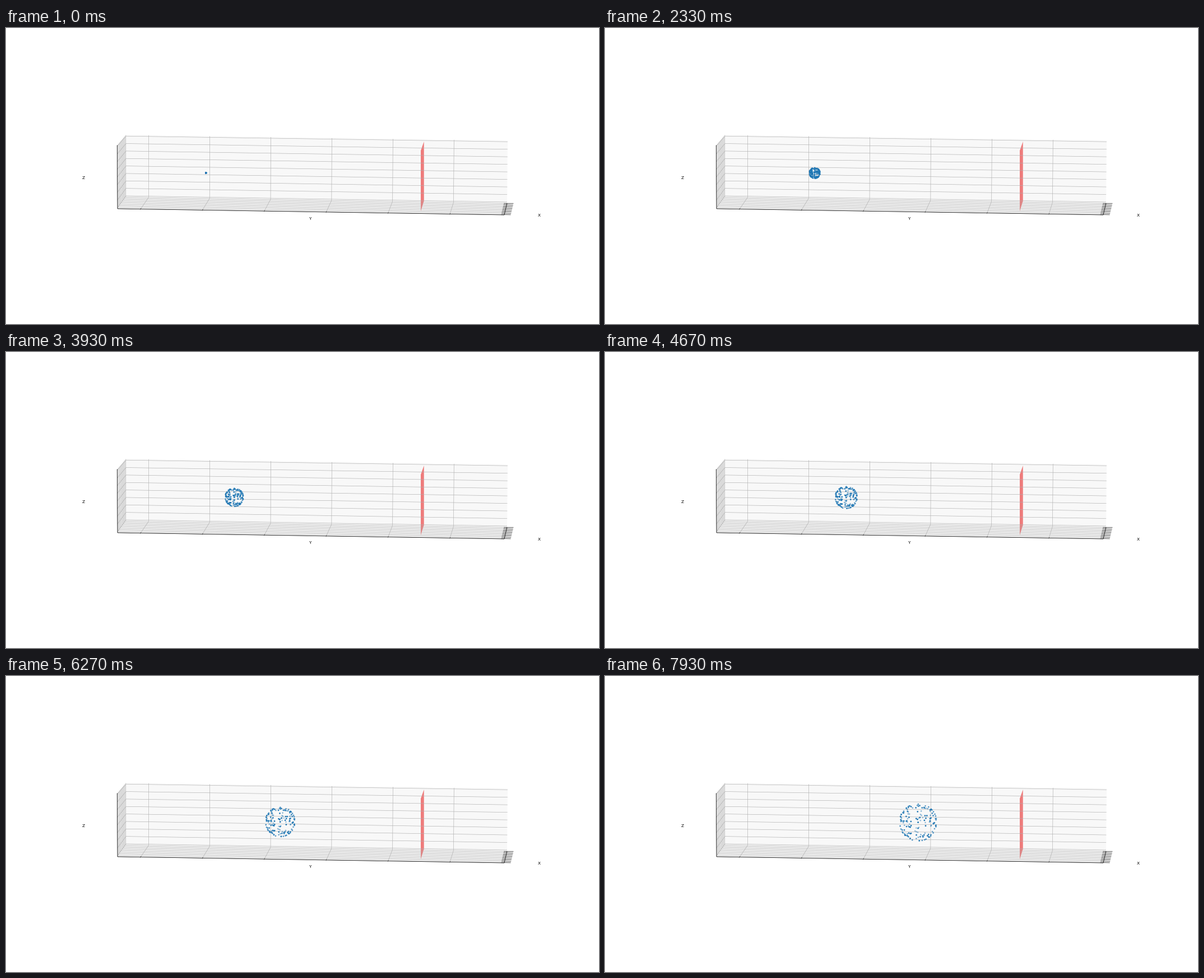
Recreate the animation shown at these times as a matplotlib script. Size 1058 by 529 pixels, loop 8 s.

```python
import numpy as np
import matplotlib.pyplot as plt
from matplotlib.animation import FuncAnimation
from matplotlib.collections import LineCollection
from matplotlib.patches import Polygon

W, H, DPI = 1058, 529, 52.9
FRAMES, LOOP_MS = 120, 8000
PX = 72 / DPI  # points per pixel

fig = plt.figure(figsize=(20, 10), dpi=DPI, facecolor="white")
ax = fig.add_axes([0, 0, 1, 1])
ax.set_xlim(0, W)
ax.set_ylim(H, 0)
ax.axis("off")

# Corners of the box: back/front, left/right, top/bottom
BLT, BRT = np.array([214, 191.2]), np.array([895, 201.2])
BLB, BRB = np.array([214, 302]), np.array([894, 313])
FLT, FLB, FRB = np.array([198.3, 209.5]), np.array([199, 323]), np.array([889, 334])


def mix(a, b, t):
    return a + (b - a) * t


def pane(corners, color, alpha=0.5):
    ax.add_patch(Polygon(corners, closed=True, fc=color, ec="none", alpha=alpha))


def lines(segments, color, width):
    ax.add_collection(LineCollection(segments, colors=color, linewidths=width * PX))


def grid(a0, a1, b0, b1, ticks):
    """Lines joining edge a0-a1 to edge b0-b1 at the given fractions."""
    return [(mix(a0, a1, t), mix(b0, b1, t)) for t in ticks]


square_ticks = np.linspace(0.018, 0.982, 9)
long_ticks = 0.0595 + 0.16 * np.arange(6)

pane([BLT, BRT, BRB, BLB], "0.95")
pane([BLT, BLB, FLB, FLT], "0.90")
pane([BLB, BRB, FRB, FLB], "0.925")

lines(
    grid(BLT, BLB, BRT, BRB, square_ticks)      # back wall, across
    + grid(BLT, BRT, BLB, BRB, long_ticks)      # back wall, upright
    + grid(BLT, BLB, FLT, FLB, square_ticks)    # side wall, across
    + grid(BLT, FLT, BLB, FLB, square_ticks)    # side wall, upright
    + grid(BLB, FLB, BRB, FRB, square_ticks)    # floor, along
    + grid(BLB, BRB, FLB, FRB, long_ticks),     # floor, in depth
    "#b0b0b0", 0.65)

# Axis lines and tick marks
lines([(FLT, FLB), (FLB, FRB), (FRB, BRB)], "black", 0.75)
x_marks = [(p + [-5.7, -0.1], p + [11.5, 0.2])
           for p in (mix(BRB, FRB, t) for t in square_ticks)]
y_marks = [(mix(f, b, 0.06), mix(f, b, -0.04))
           for b, f in grid(BLB, BRB, FLB, FRB, long_ticks)]
lines(x_marks, "black", 0.65)
lines(y_marks, "black", 0.5)

# Screen
pane([(745.7, 203), (740, 219), (740, 327.3), (745.7, 309)], (0.9, 0, 0))

for name, x, y in (("Z", 137.7, 269.6), ("Y", 542.2, 342.6), ("X", 951.3, 336.6)):
    ax.text(x, y, name, fontsize=10, family="DejaVu Sans", ha="center", va="baseline")

# Cloud of particles on a growing sphere, listed from far (pale) to near
COUNT = 155
rng = np.random.default_rng(7)
depth = np.linspace(-1, 1, COUNT)
angle = rng.uniform(0, 2 * np.pi, COUNT)
ball = np.sqrt(1 - depth**2)[:, None] * np.column_stack([np.cos(angle), np.sin(angle)])
colors = np.tile([31 / 255, 119 / 255, 180 / 255, 1.0], (COUNT, 1))
colors[:, 3] = 0.65 + 0.35 * depth
cloud = ax.scatter(ball[:, 0], ball[:, 1], s=5, c=colors, linewidths=1.5, zorder=5)


def update(i):
    shift = 0.015 * i**2 - 0.009 * max(0, i - 90) ** 2
    center = np.array([356.8, 259.0]) + shift * np.array([1, 0.0125])
    cloud.set_offsets(center + 0.282 * i * ball)
    return (cloud,)


anim = FuncAnimation(fig, update, frames=FRAMES, interval=LOOP_MS / FRAMES,
                     repeat=True, repeat_delay=0, blit=False)
plt.show()
```
